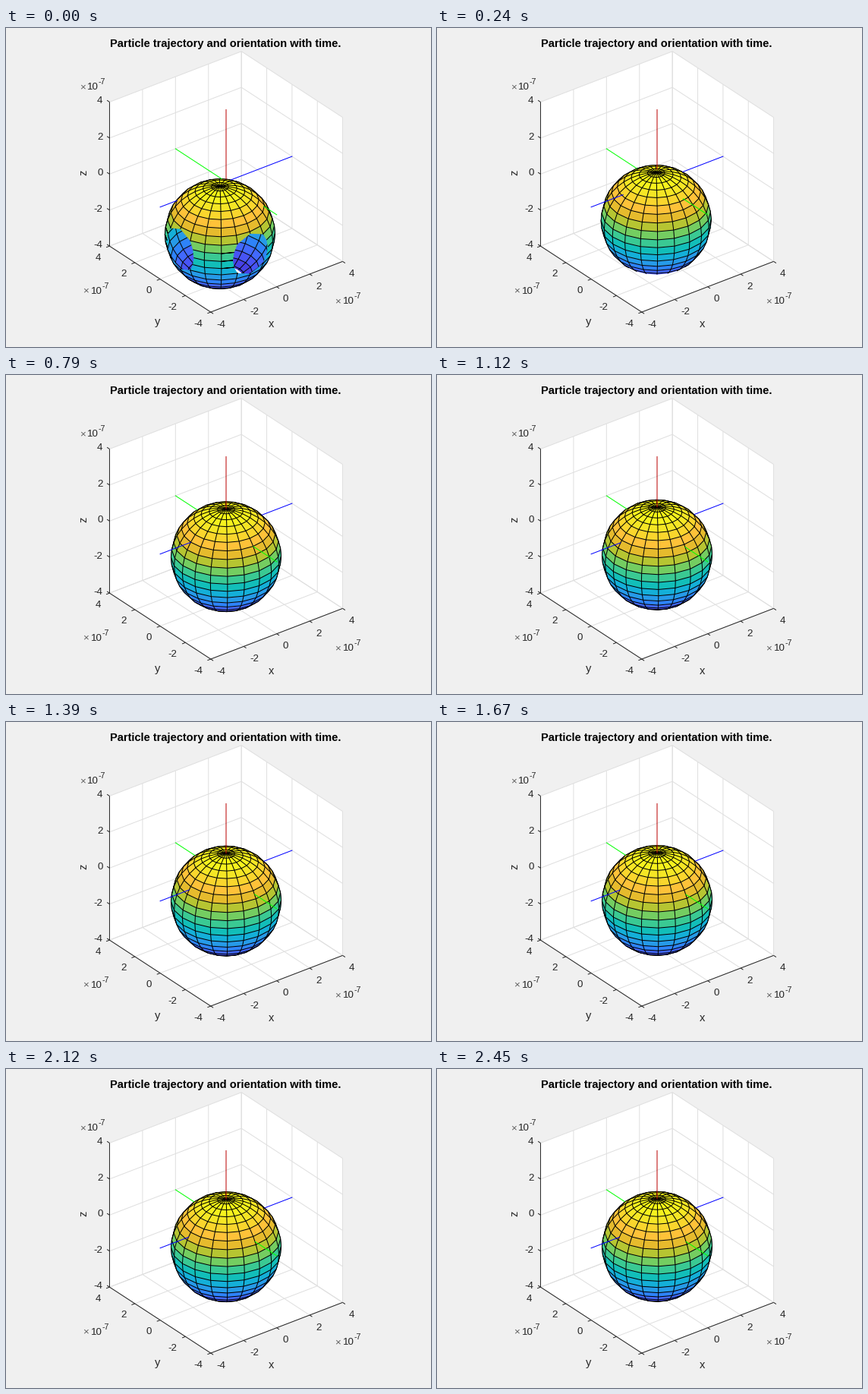
Animation, 560 px wide and 420 px high, one loop 2.51 s. Source, as a matplotlib script:

```python
import numpy as np
import matplotlib.pyplot as plt
from matplotlib.animation import FuncAnimation
from matplotlib.collections import LineCollection, PolyCollection

W, H, DPI = 560, 420, 96
LOOP_MS, TICK_MS, STEP_MS = 2510, 10, 30
LIM = 4.0                      # axis limits, in units of 1e-7
RADIUS = 2.65
SCALE = 27.38                  # pixels per unit
ORIGIN = np.array([290.0, 202.4])
PX = 72 / DPI                  # one pixel in points
INK = "#262626"

AZ, EL = np.radians([37.5, 30])
VIEW = np.array([-np.sin(AZ) * np.cos(EL), -np.cos(AZ) * np.cos(EL), np.sin(EL)])
PROJ = SCALE * np.array([
    [np.cos(AZ), -np.sin(AZ) * np.sin(EL)],
    [-np.sin(AZ), -np.cos(AZ) * np.sin(EL)],
    [0, -np.cos(EL)],
])

# One colour per ring, lowest first, taken at the ring's upper edge.
BANDS = np.array("""#3F28AD #412CBA #4434CF #4741E5 #4854F5 #4269FE #2E83F9
#269AE8 #14AFD8 #12BEB9 #3AC993 #74CD61 #B6C532 #E6BB2D #FEC239 #FAD62D
#F5E625 #F6F21E #F8F917 #F9FB15""".split())
N = len(BANDS)


def project(p):
    return np.asarray(p, float) @ PROJ + ORIGIN


def unit_sphere():
    """Quads of an N by N sphere, lowest ring first."""
    theta = np.linspace(-np.pi, np.pi, N + 1)
    phi = np.linspace(-np.pi / 2, np.pi / 2, N + 1)[:, None]
    pts = np.stack([np.cos(phi) * np.cos(theta),
                    np.cos(phi) * np.sin(theta),
                    np.sin(phi) + 0 * theta], axis=-1)
    quads = np.stack([pts[:-1, :-1], pts[:-1, 1:], pts[1:, 1:], pts[1:, :-1]], axis=2)
    return quads.reshape(-1, 4, 3)


QUADS = unit_sphere()
COLORS = np.repeat(BANDS, N)
FRONT = QUADS.mean(axis=1) @ VIEW > 0


def wire(mask):
    """Edges that touch the chosen faces, each one once."""
    grid = mask.reshape(N, N)
    lower = (grid | np.roll(grid, 1, axis=0)).ravel()
    left = (grid | np.roll(grid, 1, axis=1)).ravel()
    return np.concatenate([QUADS[lower][:, [0, 1]], QUADS[left][:, [0, 3]]])


def clip(poly):
    """Cut a polygon at the three lower limits of the box."""
    for axis in range(3):
        if len(poly) == 0 or poly[:, axis].min() >= -LIM:
            continue
        kept = []
        for a, b in zip(np.roll(poly, 1, axis=0), poly):
            da, db = a[axis] + LIM, b[axis] + LIM
            if (da < 0) != (db < 0):
                kept.append(a + (b - a) * da / (da - db))
            if db >= 0:
                kept.append(b)
        poly = np.array(kept)
    return poly


def center(t):
    """The particle slides to the axis, sinks a little, then rises slowly."""
    side = -1.6 * np.exp(-t / 130)
    z = (-1.29 - 0.535 * np.exp(-t / 872) - 1.5 * np.exp(-t / 220)
         + 1.725 * np.exp(-t / 130))
    return np.array([side, side, z])


def visible_part(line, c):
    """Screen path of a line with the parts inside or behind the ball removed."""
    d = line - c
    b = d @ VIEW
    q = RADIUS ** 2 - ((d ** 2).sum(axis=1) - b ** 2)
    hidden = (q > 0) & (np.sqrt(np.maximum(q, 0)) > b)
    path = project(line)
    path[hidden] = np.nan
    return path


fig = plt.figure(figsize=(W / DPI, H / DPI), dpi=DPI, facecolor="#F0F0F0")
ax = fig.add_axes([0, 0, 1, 1])
ax.set_xlim(0, W)
ax.set_ylim(H, 0)
ax.axis("off")


def draw_line(points, color, z=1):
    x, y = project(points).T
    ax.plot(x, y, color=color, lw=PX, zorder=z, solid_capstyle="butt")


def label(x, y, s, size=10, ha="center", color=INK, **kw):
    ax.text(x, y, s, fontsize=size, ha=ha, va="center_baseline", color=color,
            family="Liberation Sans", **kw)


def exponent(x, y):
    label(x, y, "×", ha="left", color="#606060")
    label(x + 10, y, "10", ha="left")
    label(x + 25, y - 6, "-7", size=8, ha="left")


def draw_box():
    L = LIM
    walls = [(-L, L, L), (L, L, L), (L, -L, L), (L, -L, -L), (-L, -L, -L), (-L, L, -L)]
    ax.fill(*project(walls).T, color="white", lw=0, zorder=0)
    for v in (-4, -2, 0, 2, 4):
        draw_line([(v, -L, -L), (v, L, -L), (v, L, L)], "#DFDFDF")
        draw_line([(-L, v, -L), (L, v, -L), (L, v, L)], "#DFDFDF")
        draw_line([(-L, L, v), (L, L, v), (L, -L, v)], "#DFDFDF")
    draw_line([(-L, L, L), (-L, L, -L), (-L, -L, -L), (L, -L, -L)], INK, 2)

    tick = 0.2
    for v in (-4, -2, 0, 2, 4):
        ends = {
            "x": ((v, -L, -L), (v, -L - tick, -L), (8, 15), "left"),
            "y": ((-L, v, -L), (-L - tick, v, -L), (-11, 14), "right"),
            "z": ((-L, L, v), (-L, L + tick, v), (-9, -2.5), "right"),
        }
        for start, stop, (dx, dy), ha in ends.values():
            draw_line([start, stop], INK, 2)
            x, y = project(start)
            label(x + dx, y + dy, str(v), ha=ha)

    label(289.5, 19, "Particle trajectory and orientation with time.", 11,
          color="black", fontweight="bold")
    label(350, 389, "x", 11)
    label(199.5, 385, "y", 11)
    label(102.5, 192, "z", 11, rotation=90)
    exponent(97, 76.5)
    exponent(101.5, 345)
    exponent(433.5, 358.5)


draw_box()

layers = []
for mask, z in ((~FRONT, 3), (FRONT, 5)):
    faces = PolyCollection([], edgecolors="none", linewidths=0, zorder=z)
    edges = LineCollection([], colors="black", linewidths=PX, zorder=z + 1)
    ax.add_collection(faces, autolim=False)
    ax.add_collection(edges, autolim=False)
    layers.append((mask, wire(mask), faces, edges))

span = np.linspace(-LIM, LIM, 801)[:, None]
rods = []
for direction, color in zip(np.eye(3), ("#0000FF", "#00FF00", "#BB0000")):
    artist, = ax.plot([], [], color=color, lw=PX, zorder=8, snap=False)
    rods.append((span * direction, artist))


def update(i):
    t = i * TICK_MS // STEP_MS * STEP_MS
    c = center(t)
    for mask, mesh, faces, edges in layers:
        polys, colors = [], []
        for quad, color in zip(c + RADIUS * QUADS[mask], COLORS[mask]):
            poly = clip(quad)
            if len(poly):
                polys.append(project(poly))
                colors.append(color)
        faces.set_verts(polys)
        faces.set_facecolor(colors)
        segs = [clip(seg) for seg in c + RADIUS * mesh]
        edges.set_segments([project(seg) for seg in segs if len(seg)])
    for line, artist in rods:
        artist.set_data(*visible_part(line, c).T)
    return [a for layer in layers for a in layer[2:]] + [rod[1] for rod in rods]


anim = FuncAnimation(fig, update, frames=LOOP_MS // TICK_MS, interval=TICK_MS,
                     repeat=True, repeat_delay=0, blit=False)
plt.show()
```
